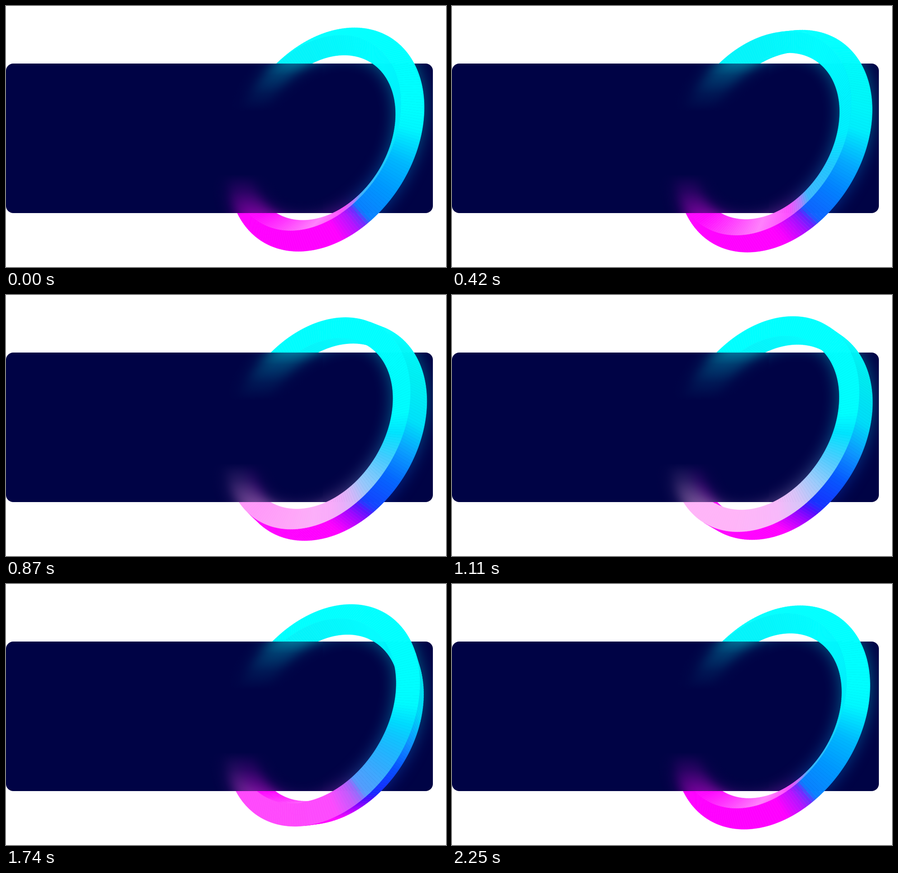
These frames come from a looping animation (972x576 px, 2.28 s). An HTML page with a canvas:

```html
<!DOCTYPE html>
<html>
<head>
<meta charset="utf-8">
<title>Turning ring</title>
<style>
  html, body { margin: 0; width: 100%; height: 100%; overflow: hidden; background: #fff; }
  canvas { display: block; }
</style>
</head>
<body>
<canvas id="stage" width="972" height="576"></canvas>
<script>
const W = 972, H = 576, LOOP = 2280, STEP = 30;
const CARD = { x: 0, y: 127, w: 943, h: 330, r: 16 };
const SPLIT = 700; // right of this the ring passes in front of the card
const NAVY = '0,3,69';
const RAD = Math.PI / 180;

// Square-section torus, seen at a tilt; the tube looks thicker on the near side
const CX = 704.5, CY = 292.7, R = 231, TUBE = 34.8, DEPTH = 0.1;
const COS = 0.723, SIN = 0.69;
const MAJOR = [-0.538, 0.843], MINOR = [0.843, 0.538];

const ctx = document.getElementById('stage').getContext('2d');
const ringCanvas = document.createElement('canvas');
ringCanvas.width = W;
ringCanvas.height = H;
const ring = ringCanvas.getContext('2d');

const rgb = n => [n >> 16, n >> 8 & 255, n & 255];
const palette = stops => stops.map(([at, colour]) => [at, rgb(colour)]);
const mix = (a, b, k) => a.map((v, i) => v + (b[i] - v) * k);

// Colours around the ring (degrees), one palette per lighting
const dark = palette([[46, 0xff00ff], [58, 0xa000ff], [65, 0x5008ff], [70, 0x1828ff],
  [86, 0x0850ff], [100, 0x1090ff], [116, 0x00d8f8], [140, 0x00e8ee], [175, 0x00ffff]]);
const plain = palette([[50, 0xff00ff], [60, 0xb414ff], [65, 0x6a30ff], [68, 0x0a80ff],
  [84, 0x0098ff], [100, 0x00b8ff], [118, 0x00f8ff], [130, 0x00ffff]]);
const pale = palette([[20, 0xffb4f8], [50, 0xf8b8fa], [64, 0xd8c4f8], [78, 0x98ccfc],
  [92, 0x50ccff], [108, 0x00e4ff], [120, 0x00ffff]]);
const inner = palette([[-5, 0xff08ff], [38, 0xff80fc], [58, 0xff50ff], [67, 0xb080ff],
  [73, 0x40b8ff], [95, 0x20c8ff], [115, 0x00f0ff], [180, 0x00fcff], [230, 0x04f4fa]]);
const tones = [[-8, dark], [41, plain], [52, plain], [80, pale], [95, pale], [112, inner]];

function sample(stops, at, read) {
  const i = stops.findIndex(s => s[0] > at);
  if (i === 0) return read(stops[0][1]);
  if (i < 0) return read(stops[stops.length - 1][1]);
  const [a, from] = stops[i - 1], [b, to] = stops[i];
  return mix(read(from), read(to), (at - a) / (b - a));
}

const colourAt = (theta, normal) =>
  sample(tones, normal, tone => sample(tone, theta, c => c));

function project(theta, phi) {
  const sin = Math.sin(theta * RAD);
  const tube = TUBE * (1 + DEPTH * sin);
  const radius = R + tube * Math.cos(phi * RAD);
  const u = radius * Math.cos(theta * RAD);
  const m = radius * sin * COS - tube * Math.sin(phi * RAD) * SIN;
  return [CX + u * MAJOR[0] + m * MINOR[0], CY + u * MAJOR[1] + m * MINOR[1]];
}

function drawRing(turn) {
  ring.clearRect(0, 0, W, H);
  ring.lineWidth = 0.6;
  const d = 1.5;
  for (let theta = -60; theta < 300; theta += d) {
    for (let k = -1; k < 3; k++) {
      const normal = 42 - turn + k * 90;
      const facing = Math.cos(normal * RAD) * Math.sin((theta + d / 2) * RAD) * SIN
        + Math.sin(normal * RAD) * COS;
      if (facing <= 0) continue;
      const lo = normal - 45, hi = normal + 45;
      ring.beginPath();
      ring.moveTo(...project(theta, lo));
      ring.lineTo(...project(theta + d, lo));
      ring.lineTo(...project(theta + d, hi));
      ring.lineTo(...project(theta, hi));
      ring.closePath();
      ring.fillStyle = ring.strokeStyle = `rgb(${colourAt(theta, normal).map(Math.round)})`;
      ring.fill();
      ring.stroke();
    }
  }
}

function stampRing(blur, alpha) {
  ctx.filter = blur ? `blur(${blur}px)` : 'none';
  ctx.globalAlpha = alpha;
  ctx.drawImage(ringCanvas, 0, 0);
  ctx.filter = 'none';
  ctx.globalAlpha = 1;
}

function drawCard() {
  ctx.save();
  ctx.beginPath();
  ctx.roundRect(CARD.x, CARD.y, CARD.w, CARD.h, CARD.r);
  ctx.fillStyle = `rgb(${NAVY})`;
  ctx.fill();
  ctx.clip();
  stampRing(18, 0.38);

  // The left ends sink into the card
  ctx.beginPath();
  ctx.rect(0, CARD.y, SPLIT, CARD.h);
  ctx.clip();
  stampRing(9, 0.15);
  const fade = ctx.createLinearGradient(0, CARD.y, 0, CARD.y + CARD.h);
  [[0, 0], [0.08, 0.45], [0.2, 0.8], [0.32, 1], [0.74, 1], [0.86, 0.62], [1, 0]]
    .forEach(([at, alpha]) => fade.addColorStop(at, `rgba(${NAVY},${alpha})`));
  ctx.fillStyle = fade;
  ctx.fillRect(0, CARD.y, SPLIT, CARD.h);
  ctx.restore();
}

function draw(now) {
  const t = Math.floor(now % LOOP / STEP) * STEP;
  drawRing(90 * t / LOOP);
  ctx.fillStyle = '#fff';
  ctx.fillRect(0, 0, W, H);
  drawCard();

  ctx.save();
  ctx.beginPath();
  ctx.rect(0, 0, W, CARD.y);
  ctx.rect(0, CARD.y + CARD.h, W, H);
  ctx.rect(SPLIT, 0, W, H);
  ctx.clip();
  stampRing(0, 1);
  ctx.restore();
}

const start = performance.now();
function tick() {
  draw(performance.now() - start);
  requestAnimationFrame(tick);
}
tick();
</script>
</body>
</html>
```
